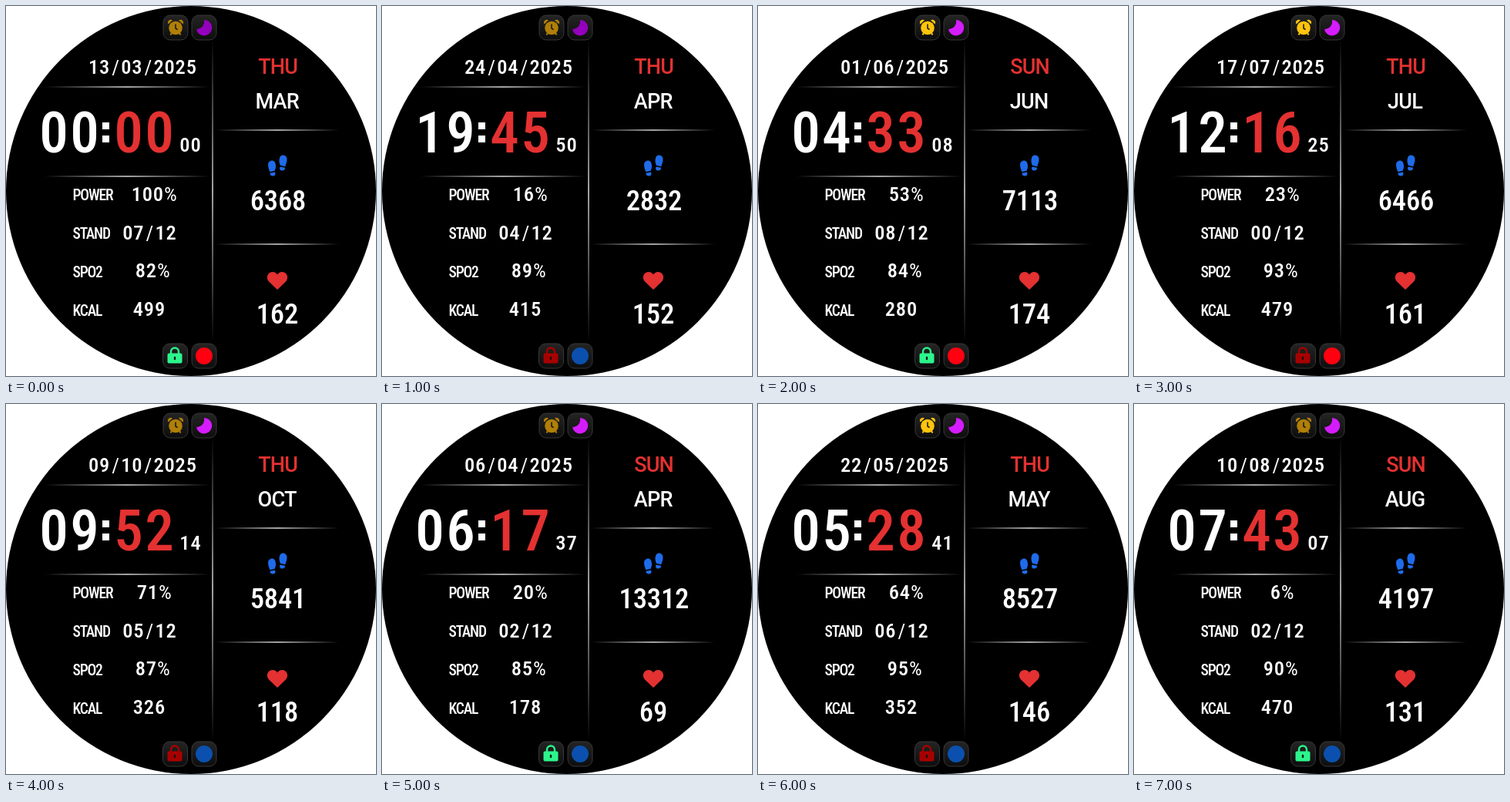
Recreate the animation shown at these times as an HTML page. Size 480 by 480 pixels, loop 8 s.

```html
<!DOCTYPE html>
<html lang="en">
<head>
<meta charset="utf-8">
<title>Watch face</title>
<style>
  html, body { margin: 0; width: 100%; height: 100%; overflow: hidden; background: #fff; }
  svg { display: block; width: 100vw; height: 100vh; }
  text { fill: #fff; white-space: pre; }
  .red { fill: #e43131; }
  .tile { fill: url(#tile); stroke: #383838; }
</style>
</head>
<body>
<svg id="face" viewBox="0 0 480 480" xmlns="http://www.w3.org/2000/svg">
  <defs>
    <linearGradient id="tile" x2="0" y2="1">
      <stop stop-color="#242424"/><stop offset="1" stop-color="#0d0d0d"/>
    </linearGradient>
    <linearGradient id="across">
      <stop stop-color="#000"/><stop offset=".5" stop-color="#a4a4a4"/><stop offset="1" stop-color="#000"/>
    </linearGradient>
    <linearGradient id="down" x2="0" y2="1">
      <stop stop-color="#000"/><stop offset=".5" stop-color="#a4a4a4"/><stop offset="1" stop-color="#000"/>
    </linearGradient>
    <g id="foot">
      <path d="M-5-4C-5-8-2-9.5.5-9.5C4-9.5 5-5 5-2C5 1 4 2 3.7 3.8L-2.8 5.2C-3.5 2-5 0-5-4Z"/>
      <path d="M-2.6 6.8L3.8 5.4C5.4 8.5 3.6 10.6 1.4 10.6C-1 10.6-2.6 9.4-2.6 6.8Z"/>
    </g>
  </defs>

  <circle cx="240" cy="240" r="240"/>
  <rect x="267" y="42" width="2" height="396" fill="url(#down)"/>
  <g fill="url(#across)">
    <rect x="50" y="104" width="214" height="2"/>
    <rect x="50" y="220" width="214" height="2"/>
    <rect x="272" y="160" width="160" height="2"/>
    <rect x="272" y="308" width="160" height="2"/>
  </g>

  <g class="tile">
    <rect x="204" y="12" width="32" height="32" rx="9"/>
    <rect x="241" y="12" width="32" height="32" rx="9"/>
    <rect x="203.500" y="438" width="32" height="32" rx="9"/>
    <rect x="241" y="438" width="32" height="32" rx="9"/>
  </g>
  <g id="alarm">
    <circle cx="220" cy="28.500" r="8.800"/>
    <path d="M210.500 23.500A3.800 3.800 0 0 1 216 18.500ZM229.500 23.500A3.800 3.800 0 0 0 224 18.500Z"/>
    <path d="M215 35L213.500 37.500M225 35L226.500 37.500" stroke="currentColor" stroke-width="2"/>
    <path d="M220 23.500V29L222.500 30.500" fill="none" stroke="#151515" stroke-width="1.500"/>
  </g>
  <path id="moon" d="M257 18A10.200 10.200 0 1 1 247 30A10 10 0 0 0 257 18Z"/>
  <g id="lock">
    <path d="M214 452V448.500A5 5 0 0 1 224 448.500V452" fill="none" stroke="currentColor" stroke-width="2.400"/>
    <rect x="209.500" y="450.500" width="19" height="13" rx="2"/>
    <path d="M219 456V458" stroke="#151515" stroke-width="2.400" stroke-linecap="round"/>
  </g>
  <circle id="link" cx="257" cy="454" r="11"/>

  <g fill="#1f6bea">
    <use href="#foot" x="345" y="210"/>
    <use href="#foot" transform="translate(359.500 203) scale(-1 1)"/>
  </g>
  <path class="red" d="M352 368L341 357.500C336 351.500 340.500 345 346 345C349 345 351 347 352 348.500C353 347 355 345 358 345C363.500 345 368 351.500 363 357.500Z"/>
  <path fill="#fff" d="M125 151h9v9h-9zM125 168h9v9h-9z"/>
</svg>

<script>
const svg = document.getElementById('face');
const make = (tag, parent) =>
  parent.appendChild(document.createElementNS('http://www.w3.org/2000/svg', tag));

const NARROW = 'condensed SIZE "Roboto Condensed", Roboto, sans-serif';
const WIDE = 'SIZE Roboto, sans-serif';

// Tracks a font so that the sample takes the wanted width.
const probe = make('text', svg);
function pick(size, weight, sample, width, stack = NARROW) {
  const font = `${weight} ${stack.replace('SIZE', size + 'px')}`;
  probe.textContent = sample;
  probe.style.font = font;
  const track = (width - probe.getComputedTextLength()) / sample.length;
  return { font, track: Math.max(track, -.06 * size) };
}

const big = pick(75, 450, '00', 80);
const mid = pick(36.5, 450, '0000', 72.5);
const small = pick(26.5, 450, '0000', 56.4);
const word = pick(27, 450, 'MAR', 56.5, WIDE);
const label = pick(19.5, 500, 'POWER', 49);
const percent = pick(26.5, 400, '%', 13.5);
const slash = pick(26.5, 400, '/', 14);
probe.remove();

function style(el, face, track = face.track) {
  el.style.font = face.font;
  el.style.letterSpacing = track + 'px';
}

function addText(face, x, y, anchor = 'middle', cls = '') {
  const el = make('text', svg);
  el.setAttribute('x', anchor === 'middle' ? x + face.track / 2 : x);
  el.setAttribute('y', y);
  el.setAttribute('text-anchor', anchor);
  el.setAttribute('class', cls);
  style(el, face);
  return el;
}

function setText(el, value) {
  el.textContent = '';
  for (const part of value.split(/([%\/])/).filter(Boolean)) {
    const span = make('tspan', el);
    span.textContent = part;
    if (part === '%') style(span, percent);
    if (part === '/') {
      style(span, slash, slash.track / 2);
      span.setAttribute('dx', slash.track / 2);
    }
  }
}

['POWER', 'STAND', 'SPO2', 'KCAL'].forEach((name, i) =>
  setText(addText(label, 86.5, 251.5 + 50 * i, 'start'), name));

const fields = [
  addText(small, 177, 88),
  addText(word, 353, 88, 'middle', 'red'),
  addText(word, 352, 133),
  addText(big, 82, 190),
  addText(big, 179, 190, 'middle', 'red'),
  addText(small, 239, 189),
  addText(small, 191, 252.5),
  addText(small, 186, 302.5),
  addText(small, 189, 352),
  addText(small, 185.5, 402),
  addText(mid, 353, 265),
  addText(mid, 352, 412),
];

// date, day, month, h, m, s, power, stand, spo2, kcal, steps, pulse | alarm, moon, lock, link
const STEPS = [
  '13/03/2025 THU MAR 00 00 00 100% 07/12 82% 499 6368 162|0010',
  '24/04/2025 THU APR 19 45 50 16% 04/12 89% 415 2832 152|0001',
  '01/06/2025 SUN JUN 04 33 08 53% 08/12 84% 280 7113 174|1110',
  '17/07/2025 THU JUL 12 16 25 23% 00/12 93% 479 6466 161|1100',
  '09/10/2025 THU OCT 09 52 14 71% 05/12 87% 326 5841 118|0101',
  '06/04/2025 SUN APR 06 17 37 20% 02/12 85% 178 13312 69|0111',
  '22/05/2025 THU MAY 05 28 41 64% 06/12 95% 352 8527 146|1101',
  '10/08/2025 SUN AUG 07 43 07 6% 02/12 90% 470 4197 131|0111',
].map(row => row.split('|'));

const LIGHTS = [
  ['alarm', '#b07f08', '#ffc40c'],
  ['moon', '#9400bd', '#d51cff'],
  ['lock', '#a80000', '#2cf58c'],
  ['link', '#ff0010', '#0b50ae'],
].map(([id, ...colors]) => [document.getElementById(id), colors]);

function show([values, flags]) {
  values.split(' ').forEach((value, i) => setText(fields[i], value));
  LIGHTS.forEach(([el, colors], i) => {
    el.style.color = el.style.fill = colors[flags[i]];
  });
}

const start = performance.now();
let shown = -1;
function tick() {
  const step = Math.floor((performance.now() - start) / 1000) % STEPS.length;
  if (step !== shown) show(STEPS[shown = step]);
  requestAnimationFrame(tick);
}
tick();
</script>
</body>
</html>
```
